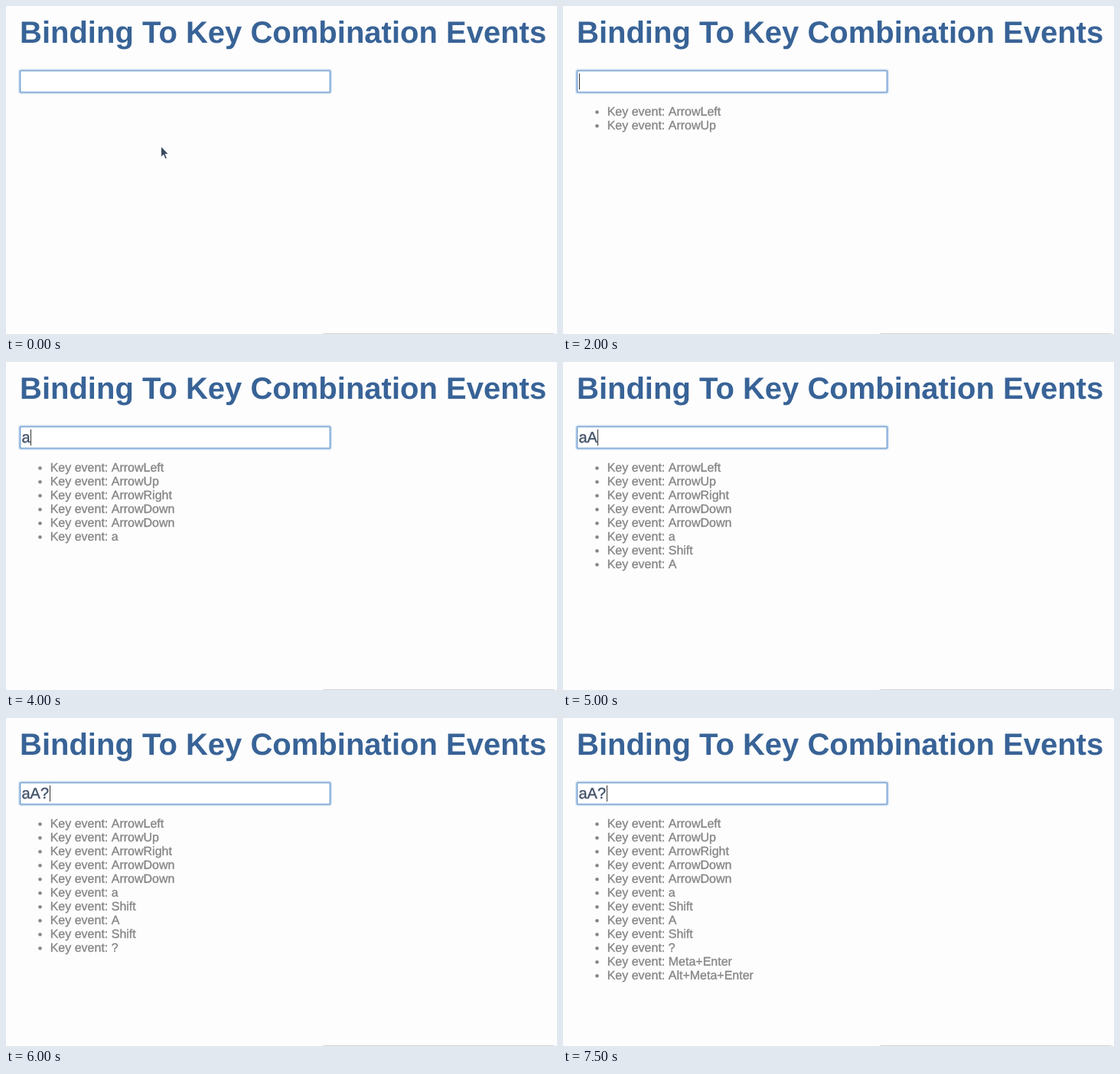
An HTML page that plays this animation: 720 by 428 pixels, repeating every 8 s.

```html
<!DOCTYPE html>
<html lang="en">
<head>
<meta charset="utf-8">
<title>Key events</title>
<style>
html, body { margin: 0; width: 100%; height: 100%; overflow: hidden; background: #fdfdfd; }
svg { display: block; }
text { font-family: "Liberation Sans", Arial, sans-serif; white-space: pre; text-rendering: geometricPrecision; }
#log text { font-size: 16px; font-kerning: none; stroke: #888; stroke-width: .35; }
#log { fill: #858585; }
#typed { font-size: 20px; font-kerning: none; fill: #43536b; stroke: #43536b; stroke-width: .4; }
</style>
</head>
<body>
<svg width="720" height="428" viewBox="0 0 720 428">
  <text x="18" y="48" font-size="40" font-weight="bold" fill="#386397">Binding To Key Combination Events</text>
  <g fill="none">
    <rect x="18" y="84" width="406" height="29" rx="2" stroke="#c3d9f0" stroke-width="4" opacity=".7"/>
    <rect x="18.5" y="84.5" width="405" height="28" rx="1" fill="#fff" stroke="#79a3d3" stroke-width="1.7"/>
  </g>
  <text id="typed" x="20.5" y="105"></text>
  <rect id="caret" y="88" width="1" height="21" fill="#333"/>
  <g id="log"></g>
  <path id="pointer" d="M202.5 183v14.2l3.2-3 2.4 5.4 2.4-1-2.4-5.3h4.3z" fill="#3b4a60" stroke="#fff" stroke-width=".9"/>
  <rect x="411.5" y="427" width="308" height="20" rx="5" fill="#d2d2d2"/>
</svg>
<script>
const LOOP = 8000;
// [time, key, character typed into the field]
const keys = [
  [1000, 'ArrowLeft'], [2000, 'ArrowUp'], [2500, 'ArrowRight'],
  [3000, 'ArrowDown'], [3000, 'ArrowDown'], [4000, 'a', 'a'],
  [4500, 'Shift'], [5000, 'A', 'A'], [5500, 'Shift'], [6000, '?', '?'],
  [7000, 'Meta+Enter'], [7500, 'Alt+Meta+Enter']
];
const caretSpans = [[1000, 1500], [2000, 2500], [4000, LOOP]];
const glyphWidth = { a: 11.12, A: 13.34, '?': 11.12 };
const $ = id => document.getElementById(id);
const show = (el, on) => el.setAttribute('visibility', on ? 'visible' : 'hidden');

$('log').innerHTML = keys.map(([, key], i) => {
  const y = 143 + 18 * i;
  return `<g><circle cx="44.5" cy="${y - 4.5}" r="2.3"/><text x="57.7" y="${y}">Key event: ${key}</text></g>`;
}).join('');
const rows = [...$('log').children];

function draw(now) {
  const t = now % LOOP;
  let typed = '', x = 21;
  keys.forEach(([at, , char], i) => {
    show(rows[i], t >= at);
    if (char && t >= at) {
      typed += char;
      x += glyphWidth[char];
    }
  });
  $('typed').textContent = typed;
  $('caret').setAttribute('x', Math.round(x));
  show($('caret'), caretSpans.some(([from, to]) => t >= from && t < to));
  show($('pointer'), t < 1000);
}

let start;
function tick(now) {
  start ??= now;
  draw(now - start);
  requestAnimationFrame(tick);
}
draw(0);
requestAnimationFrame(tick);
</script>
</body>
</html>
```
